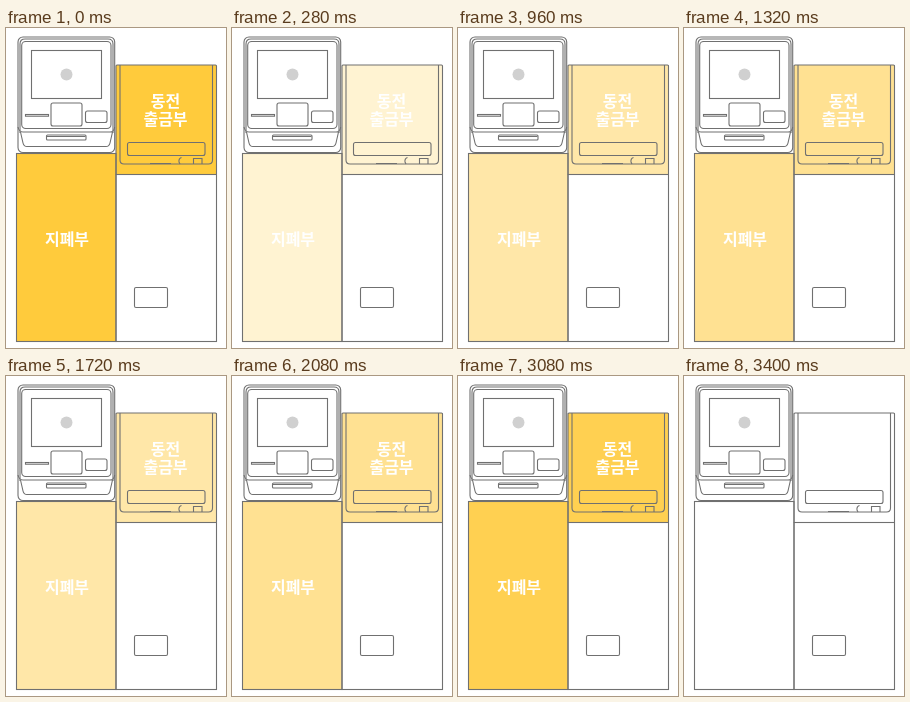
Recreate the animation shown at these times as an HTML page. Size 220x320 px, loop 3.44 s.

```html
<!DOCTYPE html>
<html lang="ko">
<head>
<meta charset="utf-8">
<style>
  html, body { margin: 0; width: 100%; height: 100%; overflow: hidden; background: #fff; }
  svg { display: block; width: 220px; height: 320px; }
  .lines { fill: none; stroke: #707070; stroke-width: 1.1; }
  text { font: bold 16px "Noto Sans CJK KR", "Noto Sans CJK", sans-serif; fill: #fff; text-anchor: middle; }
</style>
</head>
<body>
<svg viewBox="0 0 220 320">
  <g id="glow" fill="#ffcb3c">
    <rect x="10.5" y="125.5" width="99.5" height="188"/>
    <path d="M110 146.5V38q0-1 1-1H209.500q1 0 1 1V146.500Z"/>
  </g>

  <g class="lines">
    <!-- banknote machine -->
    <rect x="12" y="9" width="96.700" height="115.500" rx="5"/>
    <path d="M14 105V16q0-5 5-5H102q5 0 5 5V105"/>
    <rect x="15.700" y="13.500" width="89.300" height="87" rx="4"/>
    <path d="M12 99q1 5 5 5H104q4 0 4.700-5M14.500 104l2.500 11q.8 3.500 4 3.500H100q3.200 0 4-3.500l2.500-11"/>
    <rect x="25.500" y="22.500" width="70" height="48"/>
    <rect x="19.500" y="86.500" width="23" height="1.700"/>
    <rect x="45" y="75" width="31" height="23" rx="2"/>
    <rect x="79.500" y="83" width="21.500" height="11.500" rx="2"/>
    <rect x="40.500" y="107" width="39.500" height="5" rx="1"/>
    <path d="M41 108.500H79.500"/>
    <rect x="10.500" y="125.500" width="99.500" height="188"/>

    <!-- coin machine -->
    <path d="M110 146.500V38q0-1 1-1H209.500q1 0 1 1V146.500"/>
    <path d="M114 37V132q0 4 4 4H202.500q4 0 4-4V37"/>
    <rect x="121.500" y="114.500" width="77.500" height="13" rx="2"/>
    <path d="M175.500 129.500q-3 1-2.500 4.500l1 2M187.500 136v-5.500h8.500v5.500M144 135.500h21"/>
    <rect x="110" y="146.500" width="100.500" height="167"/>
    <rect x="128.500" y="259.500" width="33" height="20" rx="1.500"/>
  </g>

  <circle cx="60.500" cy="46.500" r="6" fill="#d0d0d0"/>
  <text x="159.500" y="79">동전</text>
  <text x="159.500" y="97">출금부</text>
  <text x="61" y="217">지폐부</text>
</svg>
<script>
  const STEP = 40, LOOP = 3440, BLINK = 19, HALF = 9;
  const glow = document.getElementById("glow");
  const start = performance.now();

  function draw() {
    const time = Math.max(0, performance.now() - start) % LOOP;
    // Fade out over nine steps, back in over nine, then hold one step.
    const phase = Math.floor(time / STEP) % BLINK;
    glow.setAttribute("opacity", Math.abs(HALF - phase) / HALF);
    requestAnimationFrame(draw);
  }
  draw();
</script>
</body>
</html>
```
